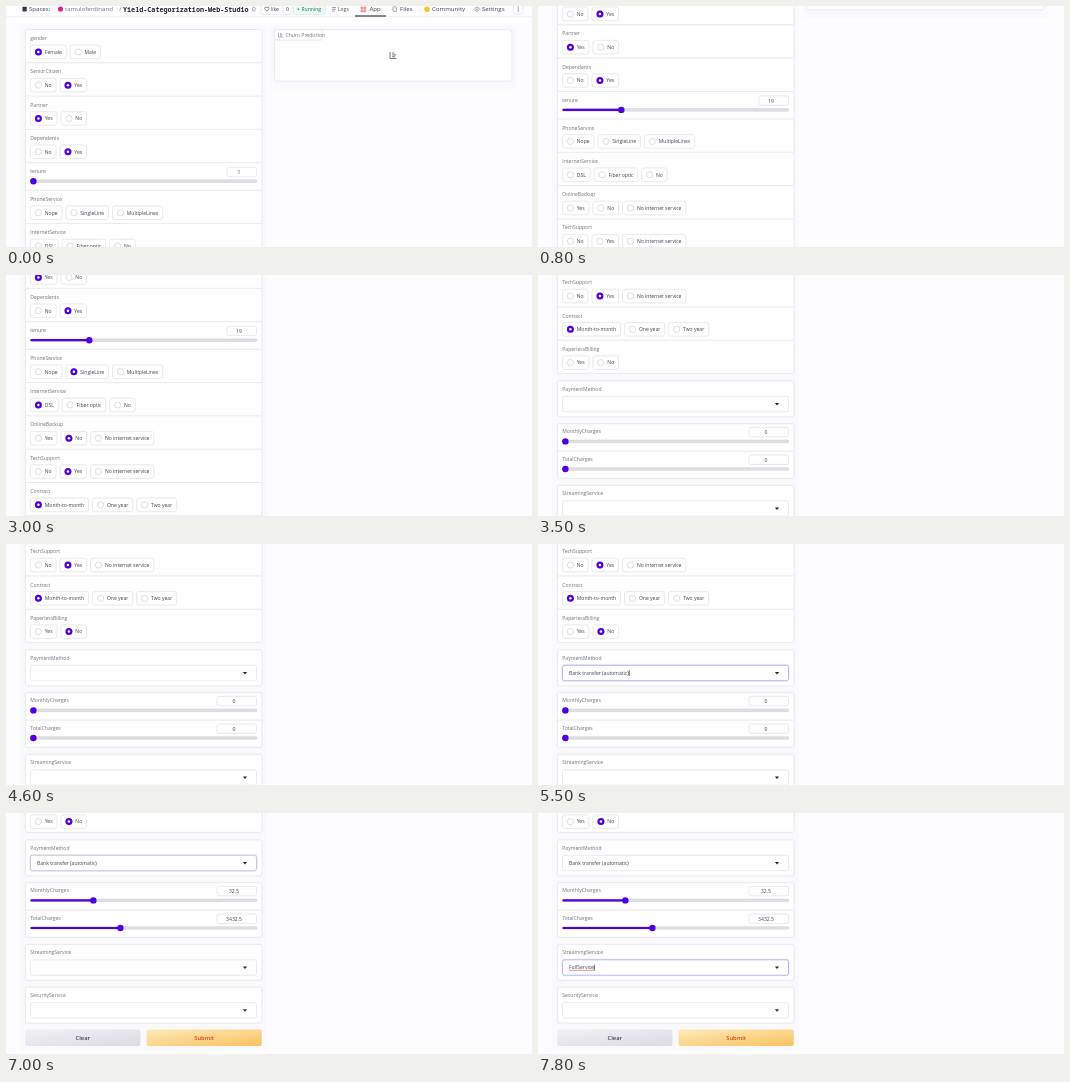
Animation of 526 by 241 pixels, one loop 8000 ms. Source, as an HTML page:

```html
<!DOCTYPE html>
<html lang="en">
<head>
<meta charset="utf-8">
<title>Churn form</title>
<style>
  html, body { margin: 0; width: 100%; height: 100%; overflow: hidden; background: #fdfcff; }
  svg { display: block; width: 526px; height: 241px; }
  text { font: 5.05px "Open Sans", "Noto Sans", sans-serif; fill: #3b4252; white-space: pre; }
  .label { fill: #6b7080; }
  .head { font-size: 6.1px; }
  .mono { font: bold 6.75px "Noto Sans Mono", "DejaVu Sans Mono", monospace; fill: #1f2430; }
  .btn { font-size: 5.8px; font-weight: 600; }
</style>
</head>
<body>
<svg id="stage" viewBox="0 0 526 241">
  <defs>
    <linearGradient id="grey" x2="1" y2="1">
      <stop stop-color="#f1f1f5"/><stop offset="1" stop-color="#dadbe2"/>
    </linearGradient>
    <linearGradient id="amber" x2="1" y2="1">
      <stop stop-color="#fde9b8"/><stop offset="1" stop-color="#f9c362"/>
    </linearGradient>
  </defs>
</svg>
<script>
const LOOP = 8000, STEP = 100;
const LINE = '#e4e4ec', ACCENT = '#4f00dc', TRACK = '#dfdfe5';
const stage = document.getElementById('stage');
const live = [];   // functions of time that refresh the picture

function add(tag, attrs, parent = page) {
  const node = document.createElementNS('http://www.w3.org/2000/svg', tag);
  for (const key in attrs) node.setAttribute(key, attrs[key]);
  parent.appendChild(node);
  return node;
}

const page = add('g', {}, stage);
const popups = add('g', {}, stage);

const box = (x, y, w, h, fill = '#fff', stroke = LINE, rx = 2, parent = page) =>
  add('rect', { x, y, width: w, height: h, rx, fill, stroke, 'stroke-width': 0.8 }, parent);
const dot = (cx, cy, r, fill, stroke = 'none') =>
  add('circle', { cx, cy, r, fill, stroke, 'stroke-width': 0.7 });
const line = (d, stroke = LINE, width = 0.8) =>
  add('path', { d, stroke, 'stroke-width': width, fill: 'none' });

// Text centred vertically on y
function text(str, x, y, cls = '', anchor = 'start', parent = page, shift = 1.8) {
  const node = add('text', { x, y: y + shift, class: cls, 'text-anchor': anchor }, parent);
  node.textContent = str;
  return node;
}

const show = (node, on) => node.setAttribute('visibility', on ? 'visible' : 'hidden');
const ramp = (t, a, b) => Math.min(1, Math.max(0, (t - a) / (b - a)));
const ease = p => p * p * (3 - 2 * p);

function header() {
  box(0, -12, 526, 22.5, '#fefdff', 'none', 0);
  line('M0 10.6H526', '#ececf2');
  box(16.5, 0.8, 4.2, 4.6, '#33363f', 'none', 0.5);
  text('Spaces:', 23, 3, 'head', 'start', page, 2.3);
  dot(54.5, 3, 2.6, '#d6249f');
  text('tamuloferdinand', 59, 3, 'head label', 'start', page, 2.3);
  text('/', 113.2, 3, 'head label', 'start', page, 2.3);
  text('Yield-Categorization-Web-Studio', 117, 3, 'mono', 'start', page, 2.5);
  box(246.5, 1.6, 2.6, 3.2, 'none', '#9a9eaa', 0.5);

  box(255, -4, 31, 12.5);
  line('M277 -4V8.5');
  line('M260.8 5.2L258.6 2.8Q258.4 1 259.8 1L260.8 2L261.8 1Q263.2 1 263 2.8Z', '#555a66', 0.7);
  text('like', 265, 3);
  text('0', 281.5, 3, '', 'middle');
  box(287.5, -4, 32, 12.5, '#eefaf3', '#d5f0e0');
  dot(292.3, 3.2, 1, '#35b56d');
  text('Running', 295.5, 3).style.fill = '#0b7a4b';
  line('M326 1.5H330M326 3.2H330M326 5H329', '#777c88', 0.7);
  text('Logs', 332, 3);

  const tab = (name, x) => text(name, x, 3, 'head', 'start', page, 2.1);
  for (const [x, y] of [[355, 1], [358, 1], [355, 4], [358, 4]])
    box(x, y, 1.9, 1.9, '#fff', '#e0524d', 0.6);
  tab('App', 363.5);
  line('M349 10H380', '#24262e', 1.1);
  box(387, 0.8, 3.4, 4.6, '#fff', '#8d92a0', 0.6);
  tab('Files', 394);
  dot(421, 3.2, 2.8, '#f7c531');
  tab('Community', 426);
  dot(471, 3.2, 2.2, '#fff', '#858a98');
  dot(471, 3.2, 0.8, '#858a98');
  tab('Settings', 476);
  box(507.5, -4, 9.5, 12);
  for (const y of [1, 3, 5]) dot(512.2, y, 0.6, '#454955');
}

function resultPanel() {
  box(264, 19, 246, 64, '#faf9fc', 'none', 3);
  box(268.4, 23.6, 237.4, 51.6);
  box(268.4, 23.6, 48, 10.6);
  const chart = (x, y, k, color) =>
    line(`M${x} ${y}v${6 * k}h${6 * k}M${x + 2 * k} ${y + k}h${2 * k}` +
         `M${x + 2 * k} ${y + 2.7 * k}h${3.6 * k}M${x + 2 * k} ${y + 4.4 * k}h${2.6 * k}`, color, 0.85 * k);
  chart(272.6, 26.8, 0.7, '#777c88');
  text('Churn Prediction', 279.5, 28.9, 'label');
  chart(384, 46, 1.08, '#666b78');
}

function radios(name, options, pick, at, top) {
  text(name, 24.3, top + 8.8, 'label');
  const cy = top + 22.4;
  let x = 24.4;
  options.forEach((option, i) => {
    const pill = box(x, cy - 6.8, 10, 13.6, '#fff', LINE, 2.4);
    const label = text(option, x + 14.4, cy);
    const width = label.getComputedTextLength() + 18.8;
    pill.setAttribute('width', width);
    dot(x + 8, cy, 3.1, '#fff', '#cfd0da');
    if (i === pick) {
      const on = [dot(x + 8, cy, 3.5, ACCENT), dot(x + 8, cy, 1.25, '#fff')];
      live.push(t => on.forEach(n => show(n, t >= at)));
    }
    x += width + 3.9;
  });
}

function slider(name, s) {
  const { y, from, max, to, start, end, step, wide } = s;
  text(name, 24.3, y - 10.2, 'label');
  box(251 - wide, y - 14, wide - 0.5, 9.4, '#fff', LINE, 2);
  const value = text('', 251 - wide / 2 - 3, y - 9.2, '', 'middle');
  box(24.4, y - 1.3, 226.4, 2.6, TRACK, '#c9c9d2', 1.3).setAttribute('stroke-width', 0.5);
  const fill = add('rect', { x: 24.4, y: y - 1.1, height: 2.2, rx: 1.1, fill: ACCENT });
  const thumb = dot(27.5, y, 3.2, ACCENT);
  live.push(t => {
    const v = from + (to - from) * ease(ramp(t, start, end));
    const x = 27.4 + 220.5 * (v - from) / (max - from);
    value.textContent = Math.round(v / step) * step;
    thumb.setAttribute('cx', x);
    fill.setAttribute('width', x - 24.4);
  });
}

function dropdown(name, top, options, pick, open = Infinity, close = Infinity, blur = Infinity, check = false) {
  box(19.4, top, 236.6, 36);
  text(name, 24.3, top + 8.3, 'label');
  const y = top + 23.2;
  const glow = box(23.9, y - 8.3, 227.2, 16.6, 'none', '#e3e4fb', 2.6);
  const field = box(24.5, y - 7.7, 226, 15.4);
  add('path', { d: `M236.9 ${y - 1}h4.2l-2.1 2.4z`, fill: '#24262e' });
  const label = text(options[pick] || '', 31, y);
  const width = label.getComputedTextLength();
  const caret = line(`M0 ${y - 2.8}v5.8`, '#222', 0.7);
  const squiggle = line(`M31 ${y + 2.8}H${31 + width}`, '#e0435c', 0.6);

  const list = add('g', {}, popups);
  const itemH = 19.2, y0 = y + 9.5;
  box(24, y0 + 1, 227, itemH * options.length + 3, '#e9e9ef', '#f1f1f5', 2.5, list);
  box(24.5, y0, 226, itemH * options.length + 2, '#fff', LINE, 2, list);
  const hover = box(25, y0 + 1, 225, itemH, '#f2f2f6', 'none', 0, list);
  options.forEach((o, i) => text(o, 36, y0 + 1 + itemH * (i + 0.5), '', 'start', list));

  live.push(t => {
    const isOpen = t >= open && t < close, chosen = t >= close;
    const focus = t >= open && t < close + 100;
    const held = t >= open && t < blur;
    show(list, isOpen);
    hover.setAttribute('y', y0 + 1 + itemH * Math.round(pick * ramp(t, open + 100, close - 200)));
    show(label, chosen);
    show(squiggle, check && chosen);
    show(caret, focus);
    caret.setAttribute('transform', `translate(${chosen ? 31.4 + width : 31.4})`);
    show(glow, held);
    field.setAttribute('stroke', focus ? '#a3a8f0' : held ? '#b9bad6' : LINE);
  });
}

function button(name, x, fill, color) {
  box(x, 581, 115.2, 16.6, `url(#${fill})`, 'none', 2);
  text(name, x + 57.6, 589.2, 'btn', 'middle', page, 2).style.fill = color;
}

function form() {
  box(14, 19, 247, 583.5, '#faf9fc', 'none', 3);
  box(19.4, 23.5, 236.6, 360.4);
  const net = 'No internet service';
  const rows = [
    ['gender', ['Female', 'Male'], 0, 0],
    ['SeniorCitizen', ['No', 'Yes'], 1, 0],
    ['Partner', ['Yes', 'No'], 0, 0],
    ['Dependents', ['No', 'Yes'], 1, 0],
    ['PhoneService', ['Nope', 'SingleLine', 'MultipleLines'], 1, 1300],
    ['InternetService', ['DSL', 'Fiber optic', 'No'], 0, 1700],
    ['OnlineBackup', ['Yes', 'No', net], 1, 2100],
    ['TechSupport', ['No', 'Yes', net], 1, 2600],
    ['Contract', ['Month-to-month', 'One year', 'Two year'], 0, 2900],
    ['PaperlessBilling', ['Yes', 'No'], 1, 4100]
  ];
  rows.forEach((row, i) => {
    const top = 23.5 + 33.28 * i + (i > 3 ? 27.7 : 0);
    if (i) line(`M19.4 ${top}H256`);
    radios(...row, top);
  });
  line('M19.4 156.7H256');
  slider('tenure', { y: 175.2, from: 1, max: 72, to: 19, start: 0, end: 500, step: 1, wide: 30 });

  dropdown('PaymentMethod', 391.3,
    ['Electronic check', 'Mailed check', 'Bank transfer (automatic)', 'Credit card (automatic)'],
    2, 4700, 5500, 7200);
  box(19.4, 434.2, 236.6, 54.6);
  line('M19.4 461.6H256');
  slider('MonthlyCharges', { y: 451.9, from: 0, max: 119.5, to: 32.5, start: 5600, end: 6100, step: 0.5, wide: 40 });
  slider('TotalCharges', { y: 479.5, from: 0, max: 8700, to: 3432.5, start: 6200, end: 6600, step: 0.5, wide: 40 });
  dropdown('StreamingService', 495.8, ['Nope', 'FullService', 'HalfService'], 1, 7300, 7800, Infinity, true);
  dropdown('SecurityService', 538.6, [], 0);
  button('Clear', 19.2, 'grey', '#3b4252');
  button('Submit', 140.6, 'amber', '#e0440e');
}

const scrollAt = t =>
  110 * ease(ramp(t, 500, 1000)) + 175.5 * ease(ramp(t, 3000, 3500)) + 79 * ease(ramp(t, 6600, 7000));

function draw() {
  const t = Math.floor(performance.now() % LOOP / STEP) * STEP;
  const shift = `translate(0 ${-scrollAt(t)})`;
  page.setAttribute('transform', shift);
  popups.setAttribute('transform', shift);
  live.forEach(update => update(t));
  requestAnimationFrame(draw);
}

header();
resultPanel();
form();
draw();
</script>
</body>
</html>
```
